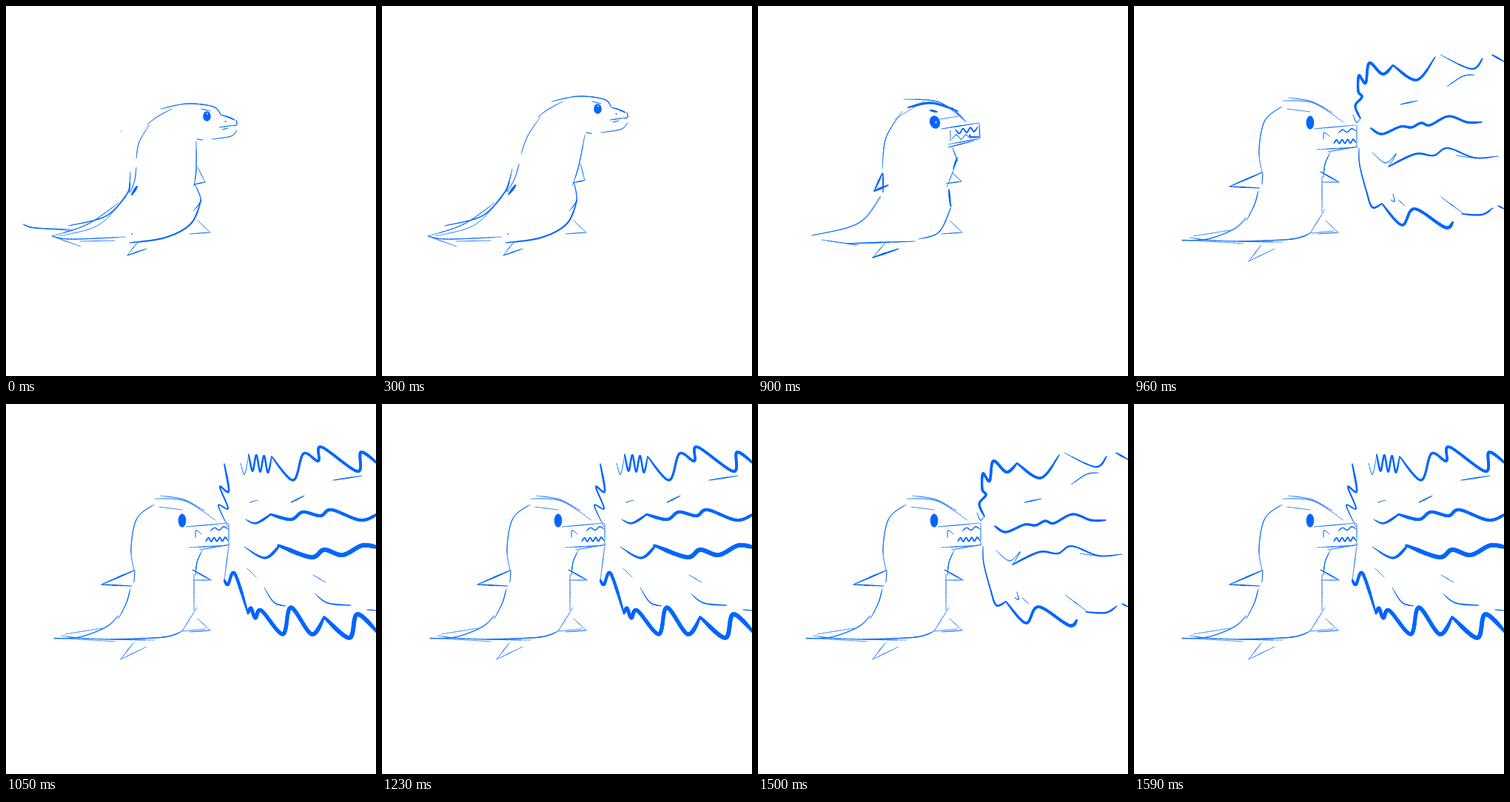
These frames come from a looping animation (500 by 500 pixels, 1680 ms). An HTML page with a canvas:

```html
<!DOCTYPE html>
<html lang="en">
<head>
<meta charset="utf-8">
<title>Fire breath sketch</title>
<style>
html, body { margin: 0; width: 100%; height: 100%; overflow: hidden; background: #fff; }
canvas { display: block; width: 500px; height: 500px; }
</style>
</head>
<body>
<canvas id="stage" width="500" height="500"></canvas>
<script>
const ctx = document.getElementById('stage').getContext('2d');
const INK = '#0066ff';
const LOOP = 1680, FIRE_AT = 960, FLICKER = 90;
let lean = [0, 0], seed = 1;

function rand() {
  seed = (seed * 16807) % 2147483647;
  return seed / 2147483647;
}

// Leaning moves the head fully and fades out towards the hips.
function bend(x, y) {
  const k = Math.min(1, Math.max(0, (260 - y) / 90));
  return [x + lean[0] * k, y + lean[1] * k];
}

function spline(a, b, c, d, t) {
  return b + t * (c - a + t * (2 * a - 5 * b + 4 * c - d + t * (3 * (b - c) + d - a))) / 2;
}

// Samples a smooth curve through a flat list of key points.
function trace(xy) {
  const pts = [], path = [], steps = 10;
  for (let i = 0; i < xy.length; i += 2) pts.push(bend(xy[i], xy[i + 1]));
  const last = pts.length - 1;
  const at = i => pts[Math.min(last, Math.max(0, i))];
  for (let n = 0; n <= last * steps; n++) {
    const i = Math.min(last - 1, Math.floor(n / steps)), t = n / steps - i;
    path.push([0, 1].map(k => spline(at(i - 1)[k], at(i)[k], at(i + 1)[k], at(i + 2)[k], t)));
  }
  return path;
}

// The width runs from w0 to w1, with a short taper at both ends.
function ink(path, w0, w1) {
  const total = path.length - 1;
  for (let n = 1; n <= total; n++) {
    const press = Math.min(1, 0.5 + Math.min(n, total - n) / 10);
    ctx.lineWidth = Math.max(0.65, (w0 + (w1 - w0) * n / total) * press);
    ctx.beginPath();
    ctx.moveTo(...path[n - 1]);
    ctx.lineTo(...path[n]);
    ctx.stroke();
  }
}

const pen = (w, ...xy) => ink(trace(xy), w, w);
const swell = (w0, w1, ...xy) => ink(trace(xy), w0, w1);

// A stroke plus a thin second pass that strays slightly from it.
function sketch(w, ...xy) {
  const path = trace(xy), n = path.length;
  ink(path, w, w);
  const part = path.slice(Math.floor(n * rand() * 0.3), Math.ceil(n * (0.7 + rand() * 0.3)));
  const dx = rand() * 4 - 2, dy = rand() * 4 - 2;
  ink(part.map(([x, y], i) => [x + dx * i / n, y + dy * i / n]), 0.7, 0.7);
}

function spike(w0, w1, ax, ay, tipX, tipY, bx, by) {
  pen(w0, ax, ay, tipX, tipY);
  pen(w1, tipX, tipY, bx, by);
}

// Row of n teeth of height h, hanging from the line between two points.
function teeth(w, x0, y0, x1, y1, n, h) {
  const xy = [];
  for (let i = 0; i <= 2 * n; i++) {
    const t = i / (2 * n);
    xy.push(x0 + (x1 - x0) * t, y0 + (y1 - y0) * t + (i % 2) * h);
  }
  pen(w, ...xy);
}

function oval(x, y, rx, ry = rx, turn = 0, fill = INK) {
  ctx.fillStyle = fill;
  ctx.beginPath();
  ctx.ellipse(...bend(x, y), rx, ry, turn, 0, Math.PI * 2);
  ctx.fill();
}

function feet(w, topX, topY, tipX, tipY) {
  spike(1.1, w, topX, topY, tipX, tipY, 190, 328);
  spike(0.9, 1.2, 259, 290, 276, 306, 248, 308);
}

function longTail() {
  pen(1.4, 23, 295, 40, 300, 88, 302);
  pen(0.8, 32, 299, 90, 304);
  oval(155.5, 169.5, 0.6);
}

function standing() {
  sketch(1.2, 85, 297, 135, 284, 163, 255, 168, 240);
  sketch(0.9, 62, 311, 110, 295, 152, 266);
  pen(0.8, 72, 311, 125, 296, 163, 257);
  pen(1, 62, 311, 101, 325);
  sketch(0.9, 63, 311, 88, 315, 162, 312);
  pen(0.9, 100, 318, 147, 317);
  sketch(2, 167, 320, 215, 313, 250, 294, 264, 262);
  oval(170, 308, 0.9);
  feet(1.6, 178, 319, 164, 337);
  sketch(1, 257, 183, 257, 220, 254, 244);
  pen(1.2, 255, 240, 263, 262, 253, 277);
  spike(1, 1.4, 259, 218, 269, 238, 254, 241);
  // back
  pen(1, 176, 206, 180, 184, 194, 160);
  pen(1, 191, 160, 204, 150, 224, 139);
  pen(1, 176, 218, 174, 235, 168, 252);
  sketch(1, 168, 224, 167, 252);
  pen(3.5, 177, 244, 170, 255);
  // head
  sketch(1.1, 209, 139, 245, 132, 280, 136, 290, 147);
  swell(1, 2, 290, 147, 300, 150, 309, 154);
  pen(1, 311, 154, 312, 160, 308, 162);
  pen(1.2, 288, 164, 309, 161);
  pen(1, 292, 167, 300, 165);
  pen(1, 278, 180, 304, 176, 312, 168);
  pen(1, 258, 180, 266, 181);
  pen(1, 264, 139, 276, 142);
  oval(296.5, 156, 1);
  oval(271.5, 149, 5.3, 6.7);
  oval(272, 145.5, 0.9, 0.9, 0, '#fff');
}

function inhale() {
  pen(3, 67, 308, 110, 301, 144, 283);
  pen(0.7, 110, 300, 153, 275);
  pen(2.5, 92, 310, 135, 296);
  pen(0.9, 71, 312, 86, 312);
  pen(1.8, 140, 298, 158, 278);
  sketch(0.8, 150, 287, 163, 265, 167, 250);
  pen(0.9, 98, 320, 128, 320);
  sketch(1, 130, 318, 175, 321, 215, 318, 243, 305);
  feet(3, 176, 320, 156, 336);
  sketch(1, 262, 186, 274, 200, 265, 226, 254, 242);
  pen(1, 254, 238, 260, 265);
  pen(2.5, 259, 262, 261, 278);
  sketch(1.8, 258, 276, 253, 291);
  pen(0.7, 253, 287, 241, 306);
  spike(1, 1, 263, 228, 271, 242, 258, 238);
  // back
  pen(0.8, 168, 195, 174, 222);
  pen(0.9, 171, 202, 172, 180, 182, 158);
  pen(1.5, 183, 149, 193, 137);
  pen(1.4, 167, 225, 169, 253);
  swell(2, 4, 167, 244, 170, 252, 180, 241);
  // head
  sketch(1, 200, 134, 228, 124, 274, 137);
  pen(1.5, 221, 135, 238, 133);
  pen(2, 250, 149, 289, 136);
  pen(1, 292, 135, 301, 152, 275, 172, 251, 186);
  pen(0.8, 252, 184, 280, 172);
  pen(1, 290, 141, 292, 146);
  oval(240.5, 143, 6.3, 6.5);
  oval(283, 148, 2.5);
}

function clench() {
  sketch(0.8, 73, 310, 120, 300, 145, 287, 166, 258);
  sketch(0.8, 86, 316, 136, 323);
  pen(1.8, 120, 321, 212, 318);
  sketch(1.2, 217, 315, 245, 305, 262, 268);
  feet(2.5, 172, 320, 155, 340);
  pen(1.2, 263, 192, 270, 210);
  pen(2.5, 269, 205, 264, 220);
  pen(1, 265, 220, 255, 245);
  pen(2.8, 258, 248, 260, 270);
  spike(1, 1.4, 262, 225, 275, 237, 254, 240);
  // back and fin
  sketch(1, 168, 220, 173, 178, 195, 142);
  spike(2.5, 3, 168, 226, 157, 250, 176, 242);
  pen(2, 169, 226, 169, 252);
  // head
  pen(3, 203, 137, 235, 131, 270, 142);
  sketch(1, 197, 126, 245, 130, 281, 157);
  pen(0.7, 185, 153, 225, 128);
  pen(1.6, 262, 137, 280, 155);
  pen(3, 233, 141, 242, 143);
  oval(239, 157, 7, 9, -0.3);
  oval(240.5, 157, 0.9, 1.6, 0, '#fff');
  // jaws
  pen(0.8, 246, 153, 270, 149);
  pen(1.4, 248, 166, 299, 158);
  sketch(1, 299, 159, 300, 178);
  pen(0.8, 260, 168, 260, 182);
  sketch(1, 257, 187, 300, 179);
  pen(1.5, 257, 191, 292, 182);
  teeth(1.6, 267, 167, 297, 163, 3, 6);
  teeth(0.9, 262, 180, 287, 180, 2, -6);
  pen(2, 286, 174, 288, 177, 299, 177);
}

function roar() {
  sketch(0.8, 65, 317, 100, 315, 135, 302, 152, 287);
  pen(0.8, 80, 311, 130, 303);
  sketch(1, 152, 290, 163, 268, 168, 250);
  pen(0.8, 65, 316, 148, 321);
  sketch(0.8, 75, 313, 110, 317, 200, 319);
  sketch(1.3, 140, 318, 213, 315, 240, 306);
  pen(1, 238, 307, 258, 275);
  feet(1, 172, 323, 155, 345);
  pen(0.8, 240, 307, 270, 304);
  // chest, arm and fin
  sketch(1, 265, 198, 258, 214, 256, 232);
  pen(1, 254, 230, 254, 279);
  spike(1.8, 1, 252, 224, 277, 238, 253, 238);
  spike(2, 1.8, 173, 225, 129, 244, 170, 246);
  pen(1.2, 174, 225, 173, 241);
  // back
  sketch(0.8, 173, 225, 169, 195, 177, 155, 200, 136);
  // head
  pen(0.9, 201, 128, 242, 131, 283, 157);
  pen(0.9, 209, 124, 240, 129, 268, 144);
  pen(0.8, 207, 139, 238, 143);
  oval(238, 157.5, 5.3, 9.3);
  // jaws
  pen(1.1, 243, 166, 299, 161);
  sketch(0.9, 247, 194, 300, 191);
  pen(1.1, 262, 197, 302, 190);
  pen(1, 301, 161, 301, 191);
  pen(0.8, 256, 180, 257, 171, 264, 176);
  teeth(1.2, 276, 172, 300, 169, 2, -4);
  teeth(1.5, 270, 186, 300, 185, 4, -5);
}

function flareLow() {
  swell(2.8, 4, 306, 152, 299, 135, 308, 123, 303, 115, 304, 94, 313, 104, 318, 77, 336, 92, 350, 80);
  swell(4, 2.8, 350, 80, 382, 100, 407, 69);
  teeth(0.9, 296, 147, 305, 153, 1, 7);
  swell(1, 3, 414, 66, 456, 85, 471, 71);
  pen(2.4, 484, 66, 500, 75);
  pen(1.2, 423, 109, 444, 95, 460, 93);
  pen(1.6, 360, 133, 383, 128);
  pen(3.1, 320, 165, 335, 173, 360, 163, 375, 164, 388, 158, 400, 161, 425, 149, 450, 157, 470, 157);
  pen(1, 322, 198, 340, 212, 354, 200, 344, 217);
  swell(2.8, 1.6, 344, 217, 380, 200, 405, 202, 424, 192, 460, 205, 492, 203);
  pen(0.9, 435, 202, 463, 206);
  swell(1, 2.8, 304, 192, 305, 215, 314, 250, 322, 272, 335, 267);
  swell(3, 4.6, 335, 267, 362, 296, 379, 274, 420, 299, 431, 292);
  pen(0.9, 347, 262, 352, 264, 350, 254);
  pen(0.9, 357, 262, 366, 270);
  pen(1.1, 415, 258, 447, 282);
  pen(2.3, 443, 281, 470, 282, 485, 273);
  pen(2, 492, 270, 500, 274);
}

function flareHigh() {
  swell(2.8, 1.2, 295, 81, 301, 118, 289, 112, 300, 141, 287, 137, 300, 166);
  teeth(0.8, 317, 80, 328, 68, 1, 21);
  teeth(2.4, 328, 68, 359, 71, 3, 22);
  swell(2.8, 4.2, 359, 71, 388, 103, 402, 67, 422, 77, 426, 58, 475, 91, 480, 65, 506, 84);
  pen(1.6, 442, 103, 481, 97);
  pen(1.8, 385, 133, 403, 124);
  pen(0.9, 329, 133, 340, 130);
  swell(1, 4, 324, 156, 338, 161, 358, 149);
  pen(4.2, 357, 149, 385, 156, 401, 146, 425, 151, 440, 143, 480, 157, 506, 146);
  swell(1, 5, 322, 193, 350, 208, 370, 191);
  pen(5.8, 368, 191, 412, 207, 430, 197, 455, 204, 482, 191, 506, 195);
  pen(0.9, 326, 222, 338, 234);
  swell(0.9, 1.8, 349, 248, 362, 268, 378, 273);
  pen(0.9, 415, 231, 432, 241);
  swell(0.9, 2.2, 417, 256, 435, 269, 466, 272);
  pen(1.4, 488, 278, 500, 279);
  pen(1, 301, 192, 295, 238);
  swell(3.6, 4.4, 295, 238, 300, 244, 309, 229, 327, 283);
  swell(4.6, 5.6, 327, 283, 331, 276, 337, 289, 345, 279, 374, 311, 385, 275, 413, 311, 430, 288);
  pen(5.8, 430, 288, 464, 316, 475, 284, 506, 313);
}

function poseAt(t) {
  if (t >= FIRE_AT) return [roar, Math.floor((t - FIRE_AT) / FLICKER) % 2 ? flareHigh : flareLow];
  if (t >= 930) return [roar];
  if (t >= 900) return [clench];
  if (t >= 450) return [inhale];
  return t < 150 ? [longTail, standing] : [standing];
}

function leanAt(t) {
  if (t >= 300 && t < 450) return [20, -10];
  return t >= 150 && t < 300 ? [7, -5] : [0, 0];
}

function draw(t) {
  ctx.fillStyle = '#fff';
  ctx.fillRect(0, 0, 500, 500);
  ctx.strokeStyle = INK;
  ctx.lineCap = 'round';
  lean = leanAt(t);
  seed = 7;
  poseAt(t).forEach(part => part());
}

let start;
function tick(now) {
  start ??= now;
  draw((now - start + 0.01) % LOOP);
  requestAnimationFrame(tick);
}
draw(0);
requestAnimationFrame(tick);
</script>
</body>
</html>
```
